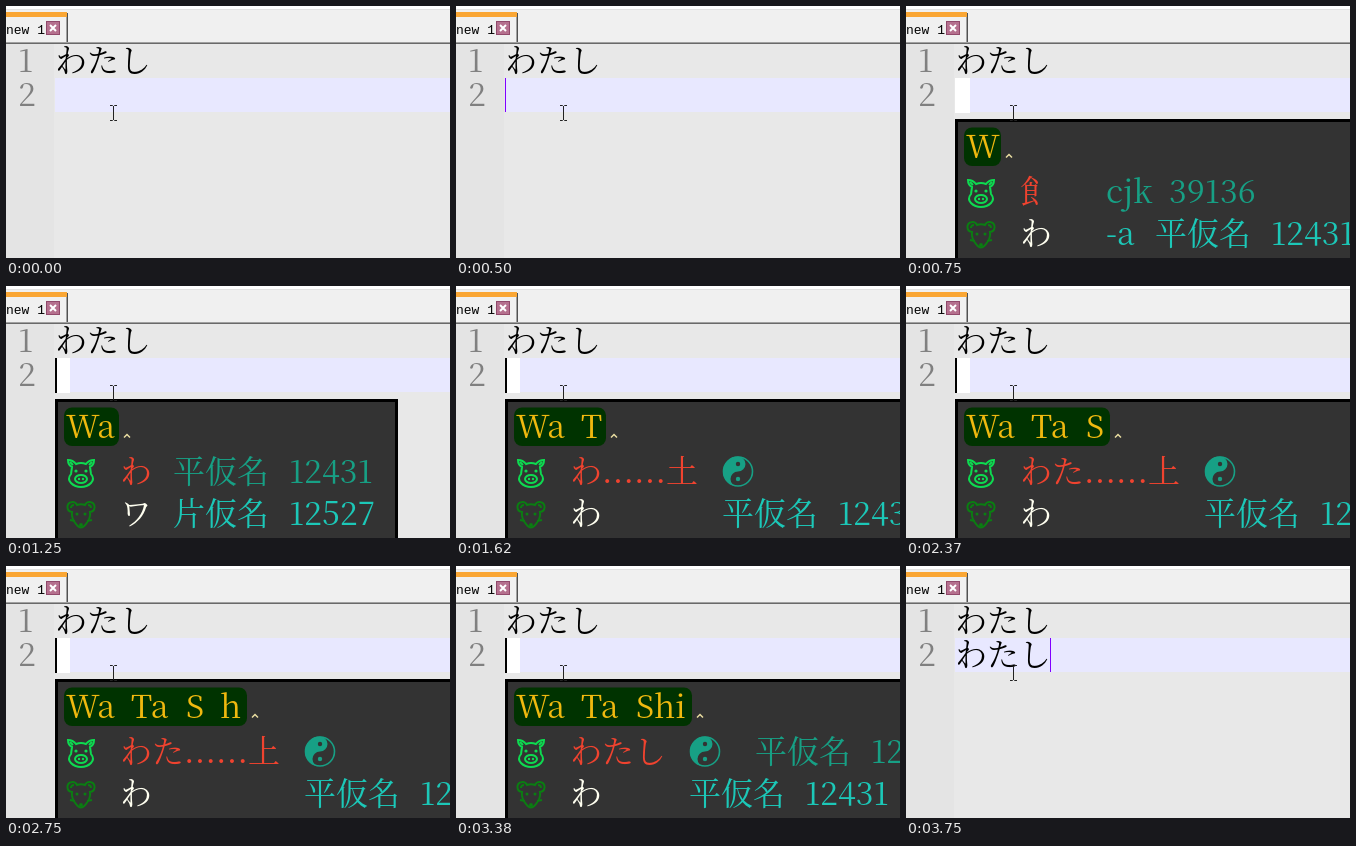
Recreate the animation shown at these times as an HTML page. Size 444 px wide and 252 px high, loop 4120 ms.

```html
<!DOCTYPE html>
<html lang="ja">
<head>
<meta charset="utf-8">
<style>
html, body { margin: 0; width: 100%; height: 100%; overflow: hidden; background: #e8e8e8; }
svg { display: block; }
text { font: 300 32px "Noto Serif CJK JP", "Noto Serif CJK SC", "Noto Sans CJK JP", "Noto Serif", serif; white-space: pre; }
.tab { font: 13px "Liberation Mono", monospace; }
.dots { text-anchor: middle; }
</style>
</head>
<body>
<svg width="444" height="252" viewBox="0 0 444 252">
  <rect width="444" height="38" fill="#f0f0f0"/>
  <rect width="444" height="3" fill="#fff"/>
  <rect y="3" width="444" height="1" fill="#e2e2e2"/>
  <rect y="6" width="61" height="5" fill="#faa634"/>
  <rect x="60" y="11" width="1" height="25" fill="#a0a0a0"/>
  <rect x="61" y="7" width="1" height="29" fill="#505050"/>
  <rect y="36" width="444" height="1" fill="#a0a0a0"/>
  <rect y="37" width="444" height="1" fill="#696969"/>
  <text class="tab" x="0" y="28">new 1</text>
  <rect x="40.5" y="15.5" width="13" height="13" fill="#b5708e" stroke="#91496b"/>
  <path d="M44 19l6 6m0-6l-6 6" stroke="#fff" stroke-width="2"/>
  <rect y="38" width="48" height="214" fill="#e4e4e4"/>
  <rect x="49" y="72" width="395" height="34" fill="#e8e8ff"/>
  <g fill="#808080"><text x="12" y="66">1</text><text x="12" y="100">2</text></g>
  <text x="49" y="66">わたし</text>
  <g id="live"></g>
  <path d="M104 99.5h2.5l1 1 1-1h2.5M107.5 100v14M104 114.5h2.5l1-1 1 1h2.5" fill="none" stroke="#222"/>
</svg>
<script>
const LOOP = 4120, WIDE = 420, EM = 32, SYLLABLE_X = [60, 125, 180, 214];
const HIRA = [[0, "平仮名"], [116, "12431"]], KATA = [[0, "片仮名"], [116, "12527"]];
const RADICAL = [[0, "cjk"], [63, "39136"]], SUFFIX = [[0, "-a"], [49, "平仮名"], [165, "12431"]];
const PHRASE = [[0, "☯"]], YIN = [...PHRASE, [66, "平仮名"], [182, "12431"]];

// start, typed, highlight end, popup width, note x, first word, first note, second word, second note
const popups = [
  [750, "W", 95, WIDE, 200, "飠", RADICAL, "わ", SUFFIX],
  [1000, "Wa", 113, WIDE, 167, "わ", HIRA, "ワ", KATA],
  [1120, "Wa", 113, 343, 167, "わ", HIRA, "ワ", KATA],
  [1620, "Wa T", 150, WIDE, 266, "わ......土", PHRASE, "わ", HIRA],
  [1750, "Wa Ta", 169, WIDE, 200, "わた", YIN, "わ", HIRA],
  [2250, "Wa Ta S", 204, WIDE, 298, "わた......上", PHRASE, "わ", HIRA],
  [2750, "Wa Ta S h", 241, WIDE, 298, "わた......上", PHRASE, "わ", HIRA],
  [3130, "Wa Ta Shi", 236, WIDE, 233, "わたし", YIN, "わ", HIRA]
];
const blinks = [1250, 1870, 2370, 2880, 3380];

const rect = (x, y, w, h, fill, rx = 0) =>
  `<rect x="${x}" y="${y}" width="${w}" height="${h}" fill="${fill}" rx="${rx}"/>`;
const text = (x, y, s, fill = "#000", cls = "") =>
  `<text x="${x}" y="${y}" fill="${fill}" class="${cls}">${s}</text>`;
const dot = (x, y, r, fill) => `<circle cx="${x}" cy="${y}" r="${r}" fill="${fill}"/>`;

const yinYang = (x, y, c) => `<g transform="translate(${x} ${y})">
  <circle r="14.5" fill="none" stroke="${c}" stroke-width="1.6"/>
  <path d="M0-15A15 15 0 0 0 0 15A7.5 7.5 0 0 1 0 0A7.5 7.5 0 0 0 0-15" fill="${c}"/>
  ${dot(0, -7.5, 2.2, "#333")}${dot(0, 7.5, 2.2, c)}</g>`;

const pig = `<g fill="none" stroke="#0ddb50" stroke-width="2">
  <path d="M66 181Q62 179 62 174Q67 174 70 178Q75 176 80 178Q83 174 88 174Q88 179 84 181L85 188Q89 193 85 197Q81 201 75 201Q69 201 65 197Q61 193 65 188Z"/>
  <path d="M64 176l3 3M86 176l-3 3"/>
  <ellipse cx="75" cy="193" rx="6" ry="4"/></g>
  ${[70, 80].map(x => dot(x, 185, 1.6, "#0ddb50")).join("")}
  ${[73, 77].map(x => dot(x, 193, 1.2, "#0ddb50")).join("")}`;

const mouse = `<g fill="none" stroke="#0b7d12" stroke-width="2">
  <path d="M66 226A5 5 0 1 1 71 219Q75 217.500 79 219A5 5 0 1 1 84 226Q85 232 80 238Q75 245 70 238Q65 232 66 226Z"/>
  <path d="M65 222a3 3 0 0 1 3-3M85 222a3 3 0 0 0-3-3M64 234l5 1M86 234l-5 1"/></g>
  ${[71, 79].map(x => dot(x, 228, 1.5, "#0b7d12")).join("")}${dot(75, 239, 2, "#0b7d12")}`;

function word(y, s, fill) {
  const [head, tail] = s.split("......");
  const x = 114 + head.length * EM;
  const dotsX = Array.from("......", (_, i) => x + (i + 0.5) * EM / 3).join(" ");
  return text(114, y, head, fill) +
    (tail ? text(dotsX, y, "......", fill, "dots") + text(x + 2 * EM, y, tail, fill) : "");
}

const note = (x, y, parts, fill) => parts.map(([dx, s]) =>
  s === "☯" ? yinYang(x + 16, y - 11.5, fill) : text(x + dx, y, s, fill)).join("");

function popup([, typed, end, width, noteX, word1, note1, word2, note2]) {
  return rect(49, 113, width, 160, "#000") + rect(52, 116, width - 6, 154, "#333") +
    rect(58, 121.5, end - 58, 38.5, "#003300", 8) +
    typed.split(" ").map((s, i) => text(SYLLABLE_X[i], 152, s, "#f0b90f")).join("") +
    `<path d="M${end + 5} 151.500l3-3 3 3" fill="none" stroke="#e8dca0" stroke-width="1.500"/>` +
    pig + mouse +
    word(197, word1, "#f0432f") + note(noteX, 197, note1, "#17a085") +
    word(239, word2, "#fffff0") + note(noteX, 239, note2, "#1cc8b8");
}

function scene(t) {
  if (t < 500) return "";
  if (t < 750) return rect(49, 72, 1, 34, "#8000ff");
  if (t >= 3750) return text(49, 100, "わたし") + rect(144, 72, 1, 34, "#8000ff");
  const caretOn = blinks.filter(b => t >= b).length % 2;
  return rect(49, 72, 15, 35, "#fff") + (caretOn ? rect(49, 72, 2, 35, "#000") : "") +
    popup(popups.findLast(p => t >= p[0]));
}

const live = document.getElementById("live"), start = performance.now();
let shown;
function draw() {
  const next = scene((performance.now() - start) % LOOP);
  if (next !== shown) live.innerHTML = shown = next;
  requestAnimationFrame(draw);
}
draw();
</script>
</body>
</html>
```
